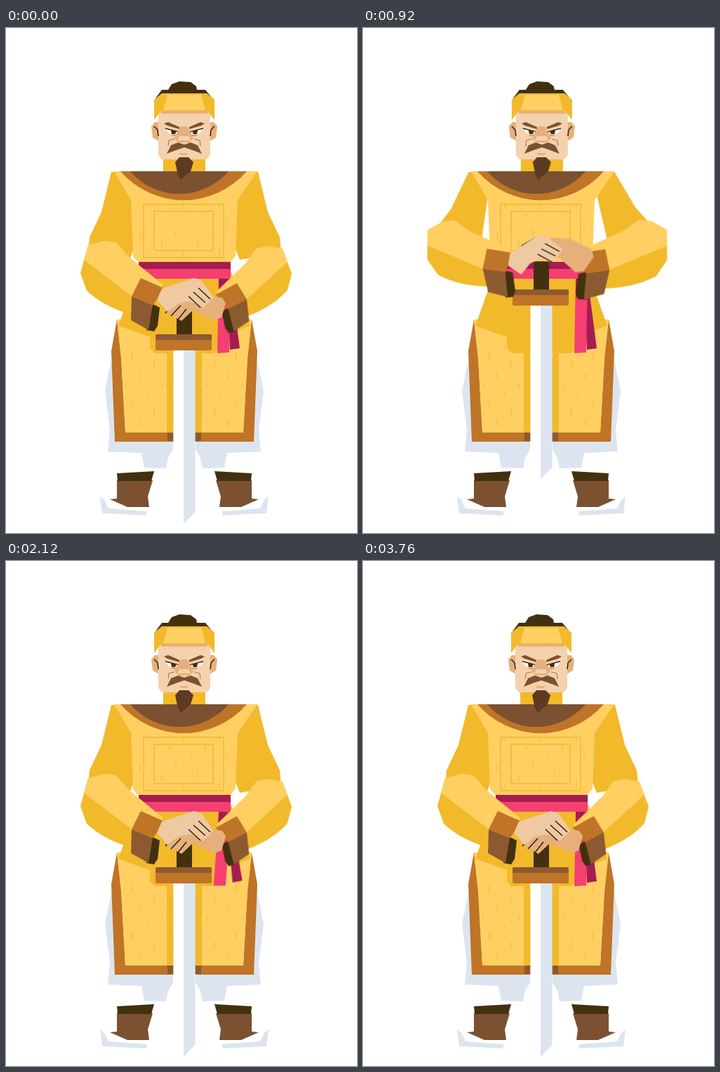
Animation of 500 by 719 pixels, one loop 3800 ms. Source, as an HTML page without scripts:

```html
<!DOCTYPE html>
<html lang="en">
<head>
<meta charset="utf-8">
<title>Warrior with sword</title>
<style>
html, body { margin: 0; width: 100%; height: 100%; overflow: hidden; background: #fff; }
svg { display: block; width: 100vw; height: 100vh; }
.gold { fill: #f2b92b; } .light { fill: #ffcf62; }
.tan { fill: #bf7427; } .brown { fill: #7b5132; } .dark { fill: #42300f; }
.shade { fill: #8c5a30; } .ice { fill: #dce5ef; } .white { fill: #fff; }
.skin { fill: #f4d2ae; } .skin2 { fill: #e6b07c; } .palm { fill: #efc9a1; }
.pink { fill: #f43f70; } .wine { fill: #a51d50; }
.line { fill: none; stroke: #2e1f0f; stroke-width: 1.5; }
.thread { fill: none; stroke: #f2b92b; stroke-width: 1.4; }
.grain { fill: url(#grain); }

/* Every lifted part moves between a low and a high placement. */
.lift, .tail { animation: lift 3.8s cubic-bezier(.333, 0, .667, 1) infinite; }
@keyframes lift {
  0%, 12.63%, 37.89%, to { transform: var(--low, none); }
  25.26% { transform: var(--high); }
}
.sword { --high: translateY(-65px); }
.head { --high: translateX(.8px); }
.upper.left {
  --low: translate(152px, 208px) rotate(0deg);
  --high: translate(152px, 208px) rotate(12deg);
}
.upper.right {
  --low: translate(357px, 208px) rotate(0deg) scale(-1, 1);
  --high: translate(357px, 208px) rotate(-17deg) scale(-1, 1);
}
.fore.left {
  --low: translate(106px, 348px) rotate(0deg);
  --high: translate(91px, 328px) rotate(-15deg);
}
.fore.right {
  --low: translate(407px, 349px) rotate(-5deg) scale(-.92, .92);
  --high: translate(434px, 329px) rotate(15deg) scale(-1.04, 1.04);
}
.hand.right {
  --low: translate(300px, 400px) rotate(0deg) scale(1);
  --high: translate(311px, 329px) rotate(18deg) scale(1.2);
}

.tail { transform-origin: 312px 357px; animation-name: swing; }
.front { --out: 8.4deg; --back: -2.8deg; }
.rear { --out: -6.6deg; --back: 2.4deg; }
@keyframes swing {
  0%, 31.6%, 99%, to { transform: rotate(0deg); }
  43.2% { transform: rotate(var(--out)); }
  68.4% { transform: rotate(var(--back)); }
}
</style>
</head>
<body>
<svg viewBox="0 0 500 719" preserveAspectRatio="none">
  <defs>
    <pattern id="grain" width="31" height="67" patternUnits="userSpaceOnUse" patternTransform="skewY(23)">
      <path d="M5 8v9M16 31v5M25 50v11" fill="none" stroke="#f2b92b"/>
    </pattern>

    <g id="leg">
      <path class="ice" d="M150 472 141 517 148 572 145 603 193 605 197 626 228 627 231 612 238 600V560H160z"/>
      <path class="ice" d="M134 667Q150 682 200 685V694L137 691z"/>
      <path class="white" d="M139 669Q160 680 204 682L200 688 146 684z"/>
      <path class="brown" d="M158 644H209L202 667 204 682H173L148 671 158 670z"/>
      <path class="dark" d="M158 634 211 631 207 645H159z"/>
      <path class="tan" d="M158 415 150 460 155 589H238.500V470z"/>
      <path class="light" id="panel" d="M158 415 164 470 170 576H230V415z"/>
      <use href="#panel" class="grain"/>
      <path class="grain" d="M165 440H230V570H172z"/>
      <path class="gold" d="M229 440H238.500V576H229z"/>
      <path class="shade" d="M230 576H238.500V588H230z"/>
      <path class="gold" d="M190 340H254V463H212L205 456V440L160 424z"/>
    </g>

    <path id="upper" class="gold" d="M-2-3H30L36 92 24 122-35 112-33 90-16 54z"/>

    <!-- the elbow is the local origin -->
    <g id="fore">
      <path class="gold" d="M11-39 34-45 51-43 69-22 118 18 99 52 72 60Q32 48 9 26L0 1z"/>
      <path class="light" d="M11-39 34-45 51-43 69-22 118 18 103 46 73 34 5-18z"/>
      <path class="dark" d="M97 42 113 50 110 76 105 84 94 82z"/>
      <path class="shade" d="M73 34 103 46 97 82 72 68z"/>
      <path class="tan" d="M86 8 120 23 103 47 73 34z"/>
    </g>

    <g id="cheek">
      <path class="skin2" d="M218 134H212L207 140 209 156 218 161z"/>
      <path class="skin" d="M217 116H254V187H222L217 181z"/>
      <path class="line" d="M211 140 216 145 217 154M227 143 246 148" />
      <path class="brown" d="M225 136 231 134 247 141V144L230 139z"/>
      <path class="white" d="M227 144 245 148 240 151 232 150z"/>
      <path class="dark" d="M235 146H243L241 151H236z"/>
      <path d="M240 158 232 160 231 168M236 153H243" fill="none" stroke="#a96e3f"/>
      <path class="gold" d="M254 93H222L211 102V131L221 118H254z"/>
      <path class="light" d="M254 95H230L224 117H254z"/>
      <path class="brown" d="M229 179 235 167 245 163 254 166V170L242 174z"/>
    </g>
  </defs>

  <use href="#leg"/>
  <use href="#leg" transform="translate(508) scale(-1 1)"/>

  <!-- belt and sash -->
  <path class="pink" d="M189 330H320V357H189z"/>
  <path class="wine" d="M189 330H320V343H189z"/>
  <path class="tail rear wine" d="M314 357 323 380 333 456 319 458z"/>
  <g class="tail front">
    <path class="pink" d="M303 357H320L318 462 301 463z"/>
    <path class="wine" d="M303 357H320V378L303 384z"/>
  </g>

  <use href="#upper" class="lift upper left"/>
  <use href="#upper" class="lift upper right"/>

  <!-- torso -->
  <path id="torso" class="light" d="M154 204H358L330 245 327 324 320 333H188L181 325 178 245z"/>
  <path class="grain" d="M190 250H318V325H190z"/>
  <path class="tan" d="M163 204A119 119 0 0 0 343 204z"/>
  <path class="brown" d="M177 204A92 92 0 0 0 317 204z"/>
  <path class="thread" d="M196 251h114v76h-114zM211 261h84v56h-84z"/>

  <g class="lift sword">
    <path class="white" d="M238.500 458H253V706L238.500 690z"/>
    <path class="ice" d="M253 458H269.500V689L253 706z"/>
    <path class="dark" d="M243 396H265V438H243z"/>
    <rect class="tan" x="213" y="436" width="80" height="23" rx="2"/>
    <rect class="shade" x="213" y="436" width="80" height="8" rx="2"/>
  </g>

  <use href="#fore" class="lift fore left"/>
  <use href="#fore" class="lift fore right"/>
  <g class="lift hand right">
    <path class="skin2" d="M8-16 13-8 7 12-2 16-34 2-50 17-73 4-60-10-20-20z"/>
    <path class="line" d="M-59-9l-14 15m22-11l-14 15m22-10l-12 15"/>
  </g>
  <g class="lift fore left">
    <path class="palm" d="M109 39 116 23 162 8 172 11 190 36 175 50 156 41 140 44 124 56z"/>
    <path class="line" d="M168 22l17 16m-24-10l17 15m-24-9l17 16"/>
  </g>

  <g class="lift head">
    <path class="gold" d="M224 180H284V204H224z"/>
    <path class="dark" d="M213 100 222 88H231L236 80 247 76 263 77 271 83 272 88H284L297 104z"/>
    <use href="#cheek"/>
    <use href="#cheek" transform="translate(508) scale(-1 1)"/>
    <path class="skin2" d="M221 118H287V122H221zM249 140H258L267 157 261 163H246L240 157z"/>
    <path class="skin" d="M247 154H260L263 160H244z"/>
    <path class="skin2" d="M246 178H260L257 181H249z"/>
    <path fill="#5d3a22" d="M241 191 247 184H260L267 191 263 204 249 216 245 210z"/>
  </g>
</svg>
</body>
</html>
```
